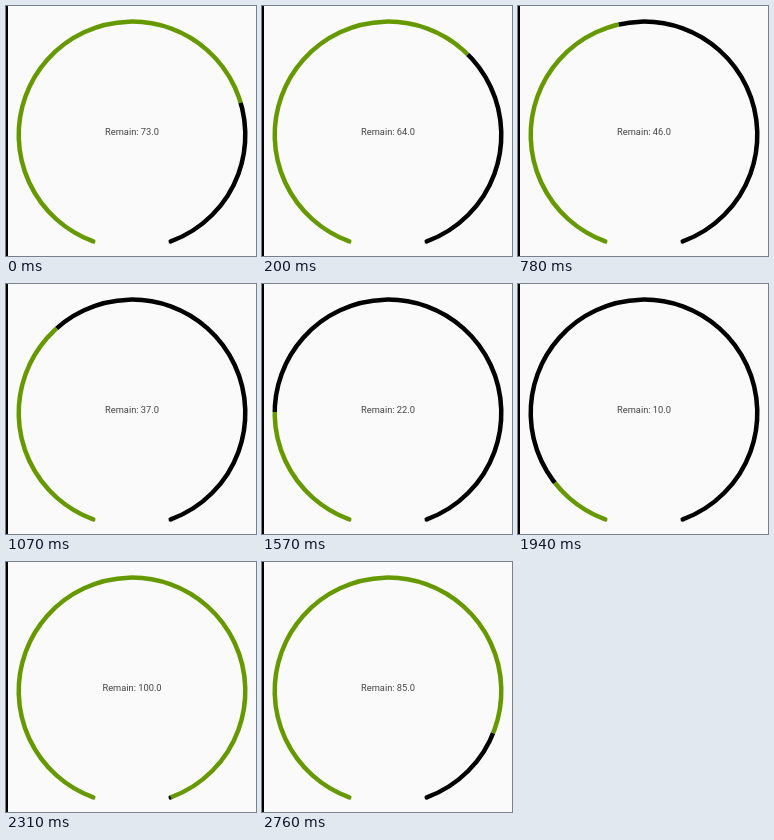
An HTML page with a canvas for the animation above (2.81 s loop, 250 by 250 pixels).

```html
<!DOCTYPE html>
<html lang="en">
<head>
<meta charset="utf-8">
<title>Countdown ring</title>
<style>
  html, body { margin: 0; width: 100%; height: 100%; overflow: hidden; background: #fafafa; }
  canvas { display: block; }
</style>
</head>
<body>
<canvas id="stage" width="250" height="250"></canvas>
<script>
const ctx = document.getElementById('stage').getContext('2d');
const LOOP = 2810, CX = 126, CY = 128.9, RADIUS = 113.3;
const GREEN = '#690', BLACK = '#000';
const rad = deg => deg * Math.PI / 180;

// Every value is held for 80 ms, some for 130 ms; the first for only 40 ms.
const longHolds = new Set([3, 6, 10, 13, 16, 20, 24, 27]);
const starts = [0, 40];
for (let i = 1; i < 30; i++) starts.push(starts[i] + (longHolds.has(i) ? 130 : 80));

// Counts down by 3 and refills to 100 after reaching 1.
const valueAt = step => step < 25 ? 73 - 3 * step : 100 - 3 * (step - 25);

function draw(value) {
  ctx.fillStyle = '#fafafa';
  ctx.fillRect(0, 0, 250, 250);
  ctx.fillStyle = BLACK;
  ctx.fillRect(0, 0, 2, 250);

  // The colour depends on the angle, measured from the bottom of the ring.
  const split = (20 + 3.2 * value) / 360;
  const sweep = ctx.createConicGradient(rad(90), CX, CY);
  sweep.addColorStop(0, GREEN);
  sweep.addColorStop(split - 0.0005, GREEN);
  sweep.addColorStop(split + 0.0005, BLACK);
  sweep.addColorStop(1, BLACK);
  ctx.strokeStyle = sweep;
  ctx.lineWidth = 4.5;
  ctx.lineCap = 'round';
  ctx.beginPath();
  ctx.arc(CX, CY, RADIUS, rad(110), rad(430));
  ctx.stroke();

  ctx.fillStyle = '#444';
  ctx.font = '9.3px Roboto, sans-serif';
  ctx.textAlign = 'center';
  ctx.fillText(`Remain: ${value.toFixed(1)}`, CX, 129);
}

function tick() {
  const time = performance.now() % LOOP;
  draw(valueAt(starts.findLastIndex(start => start <= time)));
  requestAnimationFrame(tick);
}
tick();
</script>
</body>
</html>
```
